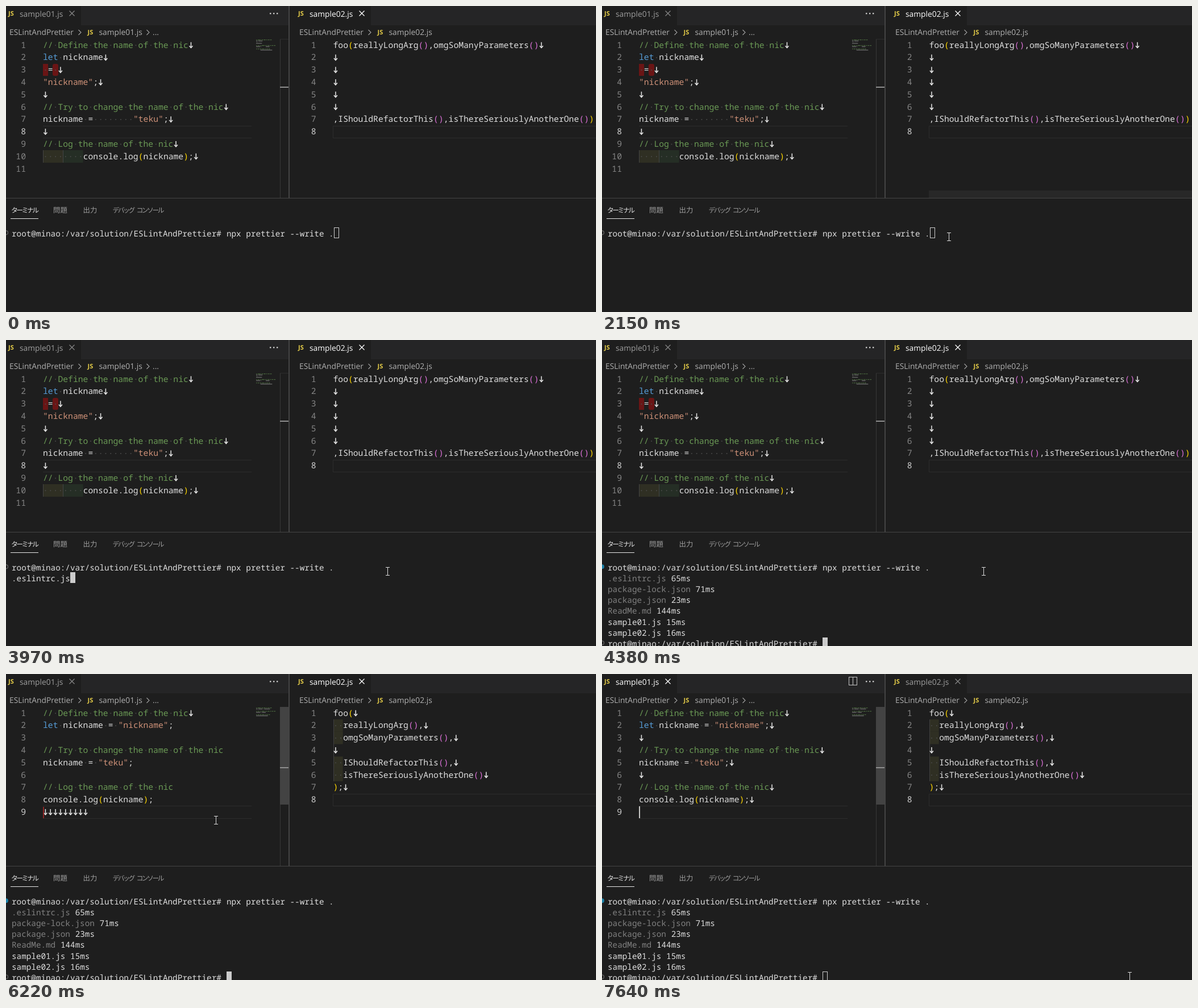
An HTML page with a canvas for the animation above (7.69 s loop, 1038 by 539 pixels).

```html
<!DOCTYPE html>
<html lang="ja">
<head>
<meta charset="utf-8">
<title>Editor and terminal</title>
<style>
html, body { margin: 0; width: 100%; height: 100%; overflow: hidden; background: #1e1e1e; }
canvas { display: block; }
</style>
</head>
<body>
<canvas id="stage" width="1038" height="539"></canvas>
<script>
const ctx = document.getElementById('stage').getContext('2d');
const LOOP = 7690;
const CW = 8.83, LH = 21.78, TOP = 58.2;      // editor grid
const TW = 8.59, TH = 19.17, TTOP = 391;      // terminal grid
const MONO = '"Noto Sans Mono", "DejaVu Sans Mono", monospace';
const CODE = `500 ${CW / 0.6}px ${MONO}`;
const TERM = `500 ${TW / 0.6}px ${MONO}`;
const UI = '13.8px "Open Sans", "Noto Sans", sans-serif';
const KANA = '"Noto Sans CJK JP", "Noto Sans CJK", sans-serif';
const FG = '#dedede', DIM = '#9d9d9d', GOLD = '#ffd700';
const PAIRS = [GOLD, '#da70d6', '#179fff'];

const messy = [
  '// Define the name of the nic↓', 'let nickname↓', ' = ↓', '"nickname";↓', '↓',
  '// Try to change the name of the nic↓', 'nickname =        "teku";↓', '↓',
  '// Log the name of the nic↓', '        console.log(nickname);↓', ''
];
const tidy = [
  '// Define the name of the nic', 'let nickname = "nickname";', '',
  '// Try to change the name of the nic', 'nickname = "teku";', '',
  '// Log the name of the nic', 'console.log(nickname);'
];
const tidyStale = [tidy[0] + '↓', ...tidy.slice(1), '↓'.repeat(9)];
const tidyFresh = [...tidy.map(s => s + '↓'), ''];
const longCall = [
  'foo(reallyLongArg(),omgSoManyParameters()↓', '↓', '↓', '↓', '↓', '↓',
  ',IShouldRefactorThis(),isThereSeriouslyAnotherOne());↓', ''
];
const splitCall = [
  'foo(↓', '  reallyLongArg(),↓', '  omgSoManyParameters(),↓', '↓',
  '  IShouldRefactorThis(),↓', '  isThereSeriouslyAnotherOne()↓', ');↓', ''
];

const PROMPT = 'root@minao:/var/solution/ESLintAndPrettier#';
// name, duration, time of appearance, rewritten
const files = [
  ['.eslintrc.js', '65ms', 3970, false],
  ['package-lock.json', '71ms', 4050, false],
  ['package.json', '23ms', 4110, false],
  ['ReadMe.md', '144ms', 4110, false],
  ['sample01.js', '15ms', 4250, true],
  ['sample02.js', '16ms', 4300, true]
];
const CLICK = 2530, ENTER = 3280, DONE = 4340, REFOCUS = 6410;

// pointer: moving spans [from, to, steps] and way points [time, x, y]
const spans = [
  [70, 500, 10], [680, 1060, 9], [1440, 1720, 7], [2670, 3090, 8],
  [5600, 5980, 9], [6970, 7640, 15]
];
const path = [
  [70, 802, 502], [230, 620, 425], [370, 420, 320], [500, 339, 275],
  [640, 339, 275], [870, 567, 265], [1060, 626, 272],
  [1400, 626, 272], [1600, 616, 365], [1720, 610, 406],
  [2529, 610, 406], [2530, 614, 405], [2630, 614, 405], [2720, 600, 406],
  [2960, 675, 408], [3090, 671, 407],
  [5179, 671, 407], [5180, 676, 407], [5219, 676, 407], [5220, 678, 407],
  [5555, 678, 407], [5760, 530, 340], [5980, 369, 254],
  [6219, 369, 254], [6220, 369, 257], [6269, 369, 257], [6270, 369, 259],
  [6925, 369, 259], [7150, 500, 360], [7400, 790, 495], [7640, 928, 532]
];

function pointerAt(t) {
  if (t < path[0][0]) return null;
  const s = spans.find(([a, b]) => t >= a && t <= b);
  if (s) {
    const step = (s[1] - s[0]) / (s[2] - 1);
    t = s[0] + Math.floor((t - s[0]) / step + 0.001) * step;
  }
  const i = path.findIndex(p => p[0] > t);
  if (i < 0) return path[path.length - 1].slice(1);
  const [t0, x0, y0] = path[i - 1], [t1, x1, y1] = path[i];
  const u = (t - t0) / (t1 - t0);
  return [x0 + (x1 - x0) * u, y0 + (y1 - y0) * u];
}

function box(x, y, w, h, color) {
  ctx.fillStyle = color;
  ctx.fillRect(x, y, w, h);
}

function frame(x, y, w, h, color) {
  ctx.strokeStyle = color;
  ctx.lineWidth = 1;
  ctx.strokeRect(x + 0.5, y + 0.5, w - 1, h - 1);
}

function line(points, color, width = 1) {
  ctx.strokeStyle = color;
  ctx.lineWidth = width;
  ctx.beginPath();
  points.forEach(([x, y]) => ctx.lineTo(x, y));
  ctx.stroke();
}

function text(s, x, y, color, font = UI, align = 'left') {
  ctx.font = font;
  ctx.fillStyle = color;
  ctx.textAlign = align;
  ctx.fillText(s, x, y);
}

function chevron(x, y, color = '#a0a0a0') {
  line([[x - 2.5, y - 4.5], [x + 2, y], [x - 2.5, y + 4.5]], color, 1.1);
}

function cross(x, y, color) {
  line([[x - 4.5, y - 4.5], [x + 4.5, y + 4.5]], color, 1.2);
  line([[x + 4.5, y - 4.5], [x - 4.5, y + 4.5]], color, 1.2);
}

function fileType(x, y) {
  text('JS', x, y, '#e3cb48', 'bold 11px "Open Sans", sans-serif');
}

function eol(x, base) {
  const c = x + CW / 2;
  line([[c, base - 10], [c, base]], '#e8e8e8', 1.5);
  line([[c - 3, base - 3.5], [c, base], [c + 3, base - 3.5]], '#e8e8e8', 1.5);
}

function drawTab(x, name, active, width) {
  box(x, 0, width, 34, '#1e1e1e');
  fileType(x + 4 + (x ? 11 : 0), 17);
  const left = x ? x + 35 : 24;
  text(name, left, 18.7, active ? '#fff' : DIM);
  cross(left + 92, 13, active ? '#fff' : '#858585');
}

function drawCrumbs(x, name) {
  text('ESLintAndPrettier', x, 51, '#b0b0b0');
  chevron(x + 124, 46.5);
  fileType(x + 137.5, 50);
  text(name, x + 157.5, 51, '#b0b0b0');
}

function tokenColor(tok) {
  if (tok.startsWith('//')) return '#6a9955';
  if (tok[0] === '"') return '#ce9178';
  return tok === 'let' ? '#569cd6' : FG;
}

function drawCode(lines, x, active) {
  const token = /\/\/[^↓]*|"[^"]*"|[()]|↓|[^\s"()↓]+/g;
  let depth = 0;
  lines.forEach((src, i) => {
    const top = TOP + i * LH, base = top + 15.5;
    text(i + 1, x - 30, base, i + 1 === active ? '#d0d0d0' : '#858585', CODE, 'right');
    for (let c = 0; c < src.length; c++)
      if (src[c] === ' ') box(x + (c + 0.5) * CW - 0.8, top + 10.2, 1.7, 1.7, '#4b4b4b');
    for (const m of src.matchAll(token)) {
      const tok = m[0], tx = x + m.index * CW;
      if (tok === '↓') { eol(tx, base); continue; }
      let color = tokenColor(tok);
      if (tok === '(') color = PAIRS[depth++ % 3];
      if (tok === ')') color = PAIRS[--depth % 3];
      text(tok, tx, base, color, CODE);
    }
  });
}

function drawMinimap(lines) {
  lines.forEach((src, i) => {
    for (const m of src.matchAll(/[^\s↓]+/g)) {
      const color = src.startsWith('//') ? 'rgba(106,153,85,.6)' : 'rgba(190,190,190,.5)';
      box(440 + m.index * 0.95, 59 + i * 2, m[0].length * 0.95 - 0.2, 1.2, color);
    }
  });
}

function sliderAlpha(t) {
  if (t >= 4470) return 1;
  if (t < 400 || t >= 1720) return 0;
  return t < 1440 ? 1 : 1 - (Math.floor((t - 1440) / 46.7) + 1) / 7;
}

function drawLeft(t) {
  const clean = t >= 4390, fresh = t >= 6470;
  const lines = !clean ? messy : fresh ? tidyFresh : tidyStale;
  const active = clean ? 9 : 8;

  for (const row of [active - 1, active])
    box(65, Math.round(TOP + row * LH), 367, 1, '#2c2c2c');
  if (!clean) {
    box(65, 102, 9, 21, '#6a1515');
    ctx.fillStyle = '#6a1515';
    ctx.beginPath();
    ctx.roundRect(82, 102, 10, 21, 3);
    ctx.fill();
    box(65, 254, 4 * CW, 22, '#2f2f23');
    box(65 + 4 * CW, 254, 4 * CW, 22, '#252e25');
    box(65, 254, 1, 22, '#444');
    box(100, 254, 1, 22, '#444');
  }
  drawCode(lines, 65, active);
  if (clean && t < REFOCUS) box(65, 234, 2, 20, '#8c2525');
  const lit = t >= REFOCUS && (t < 6970 || t >= 7470);
  if (lit) box(65, 233, 2, 21, '#c8c8c6');

  drawMinimap(lines);
  box(482, 58, 1, 280, '#383838');
  box(482, 58, 15, 1, '#2d2d2d');
  ctx.globalAlpha = sliderAlpha(t);
  box(482, 58, 16, clean ? 172 : 157, '#434343');
  ctx.globalAlpha = 1;
  box(482, clean ? 164 : 142, 15, 2, '#8e8e8e');
}

function drawRight(t, mouse) {
  const clean = t >= 4430;
  frame(575, Math.round(TOP + 7 * LH), 480, 22, '#2c2c2c');
  if (clean) {
    for (const row of [1, 2, 4, 5]) box(576, TOP + row * LH, 2 * CW - 1, LH, '#2f2f23');
    box(576, TOP + LH, 1, 5 * LH, '#404040');
  }
  drawCode(clean ? splitCall : longCall, 575.5, 8);
  if (mouse && mouse[0] > 499 && mouse[0] < 575 && mouse[1] < 338)
    line([[557.5, 67.5], [562, 72], [566.5, 67.5]], '#454545', 1.1);
  if (t >= 820 && t < CLICK) box(575, 325, 463, 13, t < 2150 ? '#313131' : '#282828');
}

function drawChrome(t) {
  const left = t >= REFOCUS;
  box(0, 0, 1038, 539, '#1e1e1e');
  box(0, 0, 1038, 34, '#252526');
  drawTab(0, 'sample01.js', left, 132);
  drawTab(499, 'sample02.js', !left, 143);
  if (left) {
    frame(434, 5, 15, 15, '#c5c5c5');
    box(441, 5, 1, 15, '#c5c5c5');
  }
  for (const x of [464, 470, 476]) box(x, 12, 2.4, 2.4, '#c5c5c5');
  drawCrumbs(6, 'sample01.js');
  chevron(250, 46.5);
  text('...', 258, 51, '#b0b0b0');
  drawCrumbs(516, 'sample02.js');
}

function drawPanelTabs() {
  const kana = (s, x, color) => {
    ctx.letterSpacing = '-2.5px';
    text(s, x, 364, color, `11.8px ${KANA}`);
    ctx.letterSpacing = '0px';
  };
  kana('ターミナル', 9, '#e7e7e7');
  box(8, 374, 49, 1, '#e7e7e7');
  text('問題', 83, 364, DIM, `12.4px ${KANA}`);
  text('出力', 135.5, 364, DIM, `12.4px ${KANA}`);
  kana('デバッグ', 187.5, DIM);
  kana('コンソール', 229.5, DIM);
}

function marker(row, color, filled) {
  ctx.beginPath();
  ctx.arc(0, TTOP + 8.3 + row * TH, filled ? 4 : 3.5, 0, 7);
  ctx.fillStyle = ctx.strokeStyle = color;
  ctx.lineWidth = 1.2;
  filled ? ctx.fill() : ctx.stroke();
}

function drawTerminal(t) {
  const put = (s, col, row, color = FG) =>
    text(s, 10 + col * TW, TTOP + 14.8 + row * TH, color, TERM);
  let row = 0, col = 66;
  marker(0, t < DONE ? '#6a6a6a' : '#1b81a8', t >= DONE);
  put(PROMPT, 0, 0);
  put('npx prettier --write .', 44, 0);
  if (t >= ENTER) { row = 1; col = 0; }
  files.forEach(([name, ms, shown, changed], i) => {
    if (t < shown) return;
    const done = t >= (i < 5 ? files[i + 1][2] : DONE);
    put(name, 0, i + 1, done && !changed ? '#808080' : FG);
    if (done) put(ms, name.length + 1, i + 1);
    row = i + 1;
    col = name.length;
  });
  if (t >= DONE) {
    put(PROMPT, 0, 7);
    marker(7, '#6a6a6a', false);
    row = 7;
    col = 44;
  }
  const x = Math.round(10 + col * TW), y = Math.round(TTOP - 1 + row * TH);
  if (t >= CLICK && t < REFOCUS) box(x, y, 9, 19, '#cccccc');
  else frame(x, y, 9, 19, '#cccccc');
}

function drawPointer([x, y]) {
  x = Math.round(x);
  y = Math.round(y);
  const arrow = y < 338 ? x > 435 && x < 575 : y < 385;
  if (!arrow) {
    for (const dy of [-7, 7]) box(x - 3, y + dy, 7, 1, '#dcdcdc');
    box(x, y - 7, 1, 15, '#dcdcdc');
    return;
  }
  ctx.beginPath();
  [[0, 0], [0, 16], [3.6, 12.6], [6, 18], [8.4, 17], [6.1, 11.7], [11, 11.5]]
    .forEach(([dx, dy]) => ctx.lineTo(x + dx, y + dy));
  ctx.closePath();
  ctx.fillStyle = '#fff';
  ctx.fill();
  ctx.strokeStyle = '#000';
  ctx.lineWidth = 1;
  ctx.stroke();
}

function draw(t) {
  const mouse = pointerAt(t);
  ctx.textRendering = 'geometricPrecision';
  drawChrome(t);
  drawLeft(t);
  drawRight(t, mouse);
  box(497, 0, 2, 338, '#444444');
  box(0, 338, 1038, 1, '#454545');
  drawPanelTabs();
  drawTerminal(t);
  if (mouse) drawPointer(mouse);
}

const start = performance.now();
(function tick() {
  draw((performance.now() - start) % LOOP);
  requestAnimationFrame(tick);
})();
</script>
</body>
</html>
```
